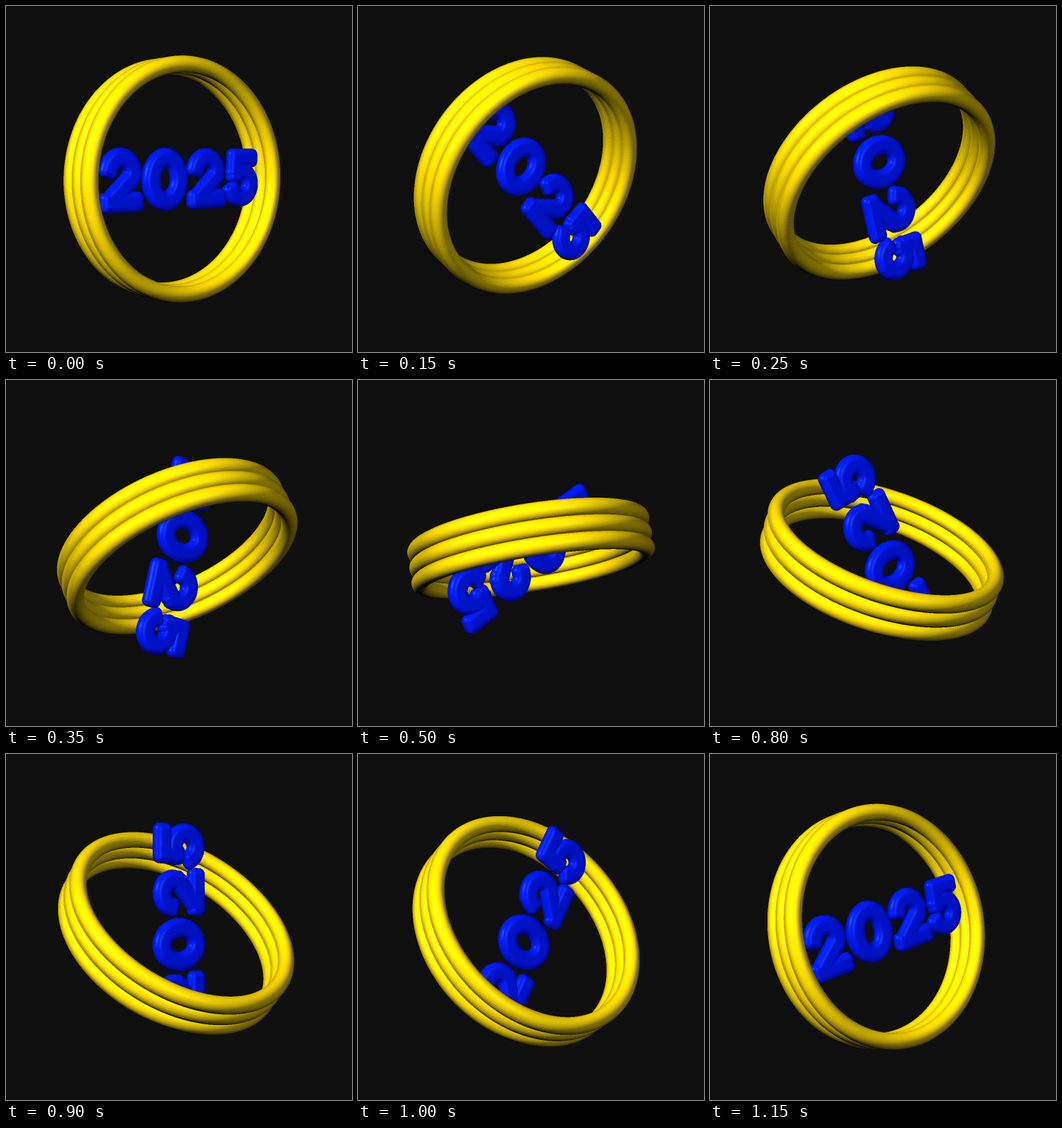
These frames come from a looping animation (512 px wide and 512 px high, 1.2 s). An HTML page with a canvas:

```html
<!DOCTYPE html>
<html lang="en">
<head>
<meta charset="utf-8">
<title>2025 in a tumbling ring</title>
<style>
  html, body { margin: 0; width: 100%; height: 100%; overflow: hidden; background: #0f0f0f; }
  canvas { display: block; width: 100vw; height: 100vh; }
</style>
</head>
<body>
<canvas id="stage" width="512" height="512"></canvas>
<script>
const SIZE = 512, BIG = SIZE * 2, STEPS = 24, STEP_MS = 50;
const TAU = Math.PI * 2, RAD = Math.PI / 180, CAMERA = 1250;
const COS = Math.cos(37 * RAD), SIN = Math.sin(37 * RAD);
const PITCH_COS = Math.cos(1.7 * RAD), PITCH_SIN = Math.sin(1.7 * RAD);
const RING = { radius: 167.7, tube: 12.2, gap: 22.7 };
const STROKE = { half: 5.5, bevel: 9.2, cap: 5 };

const unit = (x, y, z) => { const l = Math.hypot(x, y, z); return [x / l, y / l, z / l]; };
const makeLight = (x, y, z, gain) => {
  const dir = unit(x, y, z);
  return { dir, gain, half: unit(dir[0], dir[1], dir[2] + 1) };
};
const LIGHTS = [makeLight(-0.64, -0.4, 0.65, 0.85), makeLight(0.5, -0.2, 0.85, 0.5)];

const makeCanvas = size => Object.assign(document.createElement('canvas'), { width: size, height: size });
const big = makeCanvas(BIG), bigCtx = big.getContext('2d');
const image = bigCtx.createImageData(BIG, BIG);
const pixels = new Uint32Array(image.data.buffer);
const depth = new Float32Array(BIG * BIG), owner = new Uint16Array(BIG * BIG);

function arc(cx, cy, rx, ry, from, to) {
  const pts = [];
  for (let i = 0; i <= 60; i++) {
    const a = (from + (to - from) * i / 60) * RAD;
    pts.push([cx + rx * Math.cos(a), cy + ry * Math.sin(a)]);
  }
  return pts;
}

// Moves the end b away from a
function extend(a, b) {
  const k = STROKE.cap / Math.hypot(b[0] - a[0], b[1] - a[1]);
  return [b[0] + (b[0] - a[0]) * k, b[1] + (b[1] - a[1]) * k];
}

// Fills a flat, square-ended band along a path with points
function band(path, dx) {
  const pts = [], last = path.length - 1;
  const line = [extend(path[1], path[0]), ...path, extend(path[last - 1], path[last])];
  for (let i = 1; i < line.length; i++) {
    const [x0, y0] = line[i - 1], [x1, y1] = line[i];
    const len = Math.hypot(x1 - x0, y1 - y0), n = Math.ceil(len);
    const nx = (y0 - y1) / len, ny = (x1 - x0) / len;
    for (let k = 0; k <= n; k++) {
      for (let o = -STROKE.half; o <= STROKE.half; o++) {
        pts.push([dx + x0 + (x1 - x0) * k / n + nx * o, y0 + (y1 - y0) * k / n + ny * o]);
      }
    }
  }
  return pts;
}

const two = [arc(22, -12, 20, 19.5, -165, 30), [[39, -2], [6, 28]], [[2, 31], [46, 31]]];
const zero = [arc(26, 0, 25, 31.5, 0, 360)];
const five = [[[34, -31], [4, -31]], [[4, -31], [3, -6]], arc(15, 10, 20, 20.5, -125, 150)];
const glyph = (strokes, dx) => strokes.flatMap(path => band(path, dx));
const text = [...glyph(two, -126), ...glyph(zero, -52), ...glyph(two, 28), ...glyph(five, 104)];

let balls;

// Projects a ball given in the yawed space (x, y, n) and depth tests it
function addBall(x, y, n, radius, isText) {
  const far = n * COS - x * SIN;
  const z = far * PITCH_COS - y * PITCH_SIN, k = 2 * CAMERA / (CAMERA - z);
  const cx = BIG / 2 + (x * COS + n * SIN) * k;
  const cy = BIG / 2 + (y * PITCH_COS + far * PITCH_SIN) * k, r = radius * k;
  const id = balls.push({ cx, cy, r, isText }) - 1;
  const zr = radius / r, r2 = r * r;
  const top = Math.ceil(cy - r), bottom = Math.floor(cy + r);
  for (let py = top; py <= bottom; py++) {
    const dy = py - cy, w2 = r2 - dy * dy;
    if (w2 <= 0) continue;
    const w = Math.sqrt(w2), last = Math.floor(cx + w);
    for (let px = Math.ceil(cx - w); px <= last; px++) {
      const i = py * BIG + px;
      if (depth[i] >= z + radius) continue;
      const dx = px - cx, d = z + Math.sqrt(Math.max(0, w2 - dx * dx)) * zr;
      if (d > depth[i]) { depth[i] = d; owner[i] = id; }
    }
  }
}

function addRings(tilt) {
  const c = Math.cos(tilt), s = Math.sin(tilt), n = 1500;
  for (let j = -1; j <= 1; j++) {
    const off = j * RING.gap;
    for (let i = 0; i < n; i++) {
      const a = i / n * TAU, x = RING.radius * Math.cos(a), y = RING.radius * Math.sin(a);
      addBall(x, y * c + off * s, off * c - y * s, RING.tube, false);
    }
  }
}

function addText(spin) {
  const c = Math.cos(spin), s = Math.sin(spin);
  for (const [x, y] of text) addBall(x * c - y * s, x * s + y * c, 0, STROKE.bevel, true);
}

const byte = v => Math.max(0, Math.min(255, Math.round(v * 255)));

function shade(ball, px, py) {
  const x = (px - ball.cx) / ball.r, y = (py - ball.cy) / ball.r;
  const z = Math.sqrt(Math.max(0, 1 - x * x - y * y));
  const dot = v => Math.max(0, x * v[0] + y * v[1] + z * v[2]);
  let lit = 0.03, shine = 0;
  for (const { dir, half, gain } of LIGHTS) {
    lit += gain * Math.pow(dot(dir), 0.8);
    shine += gain * Math.pow(dot(half), 50);
  }
  const [r, g, b] = ball.isText
    ? [0.2 * shine, 0.1 * lit + 0.25 * shine, 0.34 + 0.62 * lit]
    : [lit, 0.86 * lit + 0.15 * shine, 0.15 * shine];
  return (255 << 24 | byte(b) << 16 | byte(g) << 8 | byte(r)) >>> 0;
}

function render(step) {
  const t = step / STEPS;
  balls = [null];
  depth.fill(-1e4);
  owner.fill(0);
  pixels.fill(0);
  addText(t * TAU);
  addRings(t * Math.PI);
  for (let i = 0; i < owner.length; i++) {
    if (owner[i]) pixels[i] = shade(balls[owner[i]], i % BIG, i / BIG | 0);
  }
  bigCtx.putImageData(image, 0, 0);
  const out = makeCanvas(SIZE);
  out.getContext('2d').drawImage(big, 0, 0, SIZE, SIZE);
  return out;
}

const ctx = document.getElementById('stage').getContext('2d');
const cache = [];
const pose = step => cache[step] || (cache[step] = render(step));
let shown = -1;

function draw() {
  const step = Math.floor(performance.now() / STEP_MS) % STEPS;
  if (step !== shown) {
    ctx.clearRect(0, 0, SIZE, SIZE);
    ctx.drawImage(pose(step), 0, 0);
    shown = step;
  } else {
    pose((step + 1) % STEPS);
  }
  requestAnimationFrame(draw);
}
draw();
</script>
</body>
</html>
```
